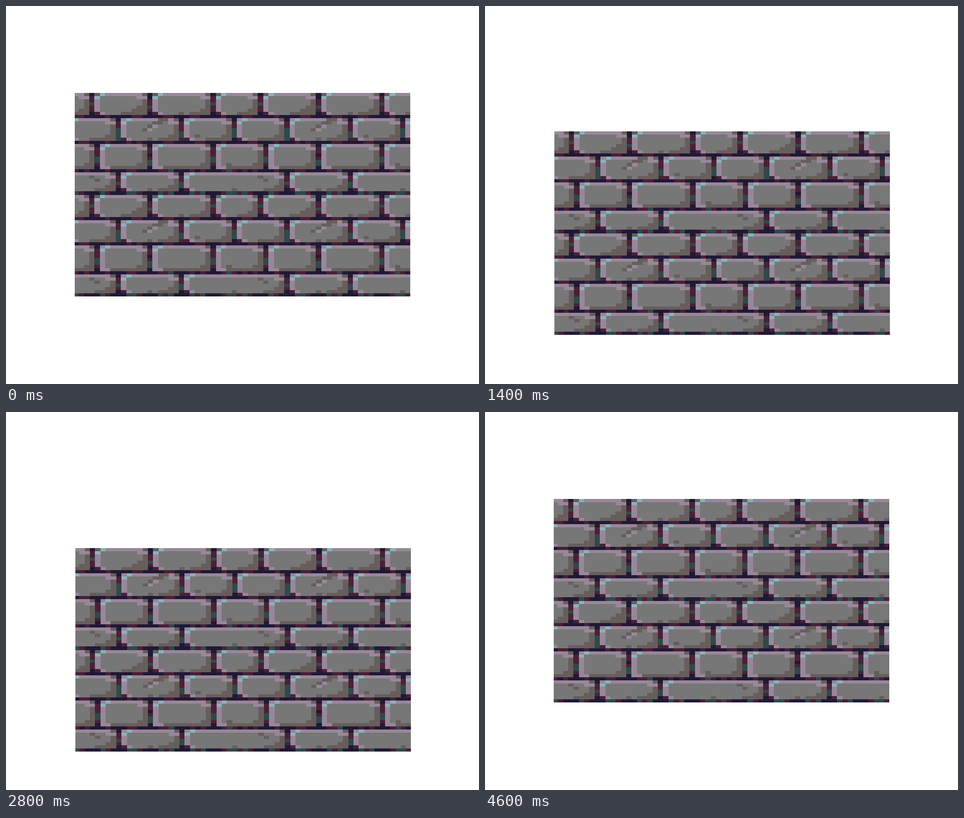
An HTML page with a canvas for the animation above (4800 ms loop, 750 by 600 pixels).

```html
<!DOCTYPE html>
<html lang="en">
<head>
<meta charset="utf-8">
<title>Brick wall</title>
<style>
  html, body { margin: 0; width: 100%; height: 100%; overflow: hidden; background: #fff; }
  canvas { display: block; }
</style>
</head>
<body>
<canvas id="stage" width="750" height="600"></canvas>
<script>
const COLORS = {
  body: '#777777', light: '#988799', glint: '#89b3bb', shade: '#675e5b',
  n: '#201936', m: '#4a2137', t: '#2e4a4b'
};
const TILE = 32, WIDTH = 532, HEIGHT = 323;
const CELL_X = 8.356, CELL_Y = HEIGHT / 64, INSET = 2;

// Each course of bricks is split by upright joints: column -> mortar colours, top down.
const courses = [
  { top: 0, height: 7, joints: { 3: 'nmmtmmn', 14: 'nnmmtmn', 26: 'nmmtmmn' } },
  { top: 8, height: 7, joints: { 8: 'nmmtttt', 20: 'nmmmttm', 30: 'nmmtttn' } },
  { top: 16, height: 8, joints: { 4: 'nmmmttmn', 14: 'nmmnmttn', 26: 'nmmmttmn' } },
  { top: 25, height: 6, joints: { 8: 'nmmtmn', 20: 'nmmttn' } }
];

const wall = document.createElement('canvas');
wall.width = WIDTH;
wall.height = HEIGHT;
const paint = wall.getContext('2d');

// Paints a run of cells in every repeat of the tile.
function cells(color, col, row, w = 1, h = 1) {
  paint.fillStyle = COLORS[color];
  for (let c = col; c < col + w; c++) {
    for (let x = c % TILE; x < 64; x += TILE) {
      const left = Math.round(x * CELL_X - INSET);
      const right = Math.round((x + 1) * CELL_X - INSET);
      for (let y = row; y < 64; y += TILE) {
        const up = Math.round(y * CELL_Y);
        paint.fillRect(left, up, right - left, Math.round((y + h) * CELL_Y) - up);
      }
    }
  }
}

function brick(col, row, w, h) {
  const right = col + w - 1, bottom = row + h - 1, deep = h === 8;
  cells('body', col, row, w, h);
  cells('light', col, row, w);
  cells('light', col, row, 1, h);
  cells('glint', col + 1, row);
  cells('glint', col, row + 1);
  cells('shade', right, row + 2, 1, h - 2);
  cells('light', right, row + 1);
  cells('light', right - 1, row + 1);
  cells('shade', right, row);
  cells('shade', right - 1, bottom - 1, 1, 2);
  if (deep) cells('shade', col + 2, bottom, w - 2);
  else {
    cells('shade', right - 3, bottom, 3);
    cells('shade', col + (w >> 1), bottom);
  }
  cells('light', col + 1, bottom);
  cells(deep ? 'light' : 'm', col, bottom);
  if (row === 0) cells('shade', col, row);
}

function bedJoint(row, columns) {
  const last = row === TILE - 1;
  for (let col = 0; col < TILE; col++) {
    const near = columns.some(j => Math.abs(j - col) < 2);
    const fleck = (col * 7 + row * 3) % 11;
    const color = near ? 'n' : last ? (fleck < 4 ? 'm' : 't') : fleck < 1 ? 't' : fleck < 4 ? 'n' : 'm';
    cells(color, col, row);
  }
}

courses.forEach(({ top, height, joints }, i) => {
  const columns = Object.keys(joints).map(Number);
  const below = Object.keys(courses[(i + 1) % courses.length].joints).map(Number);
  columns.forEach((col, j) => {
    const next = columns[j + 1] ?? columns[0] + TILE;
    brick(col + 1, top, next - col - 1, height);
    [...joints[col]].forEach((color, y) => cells(color, col, top + y));
  });
  bedJoint(top + height, columns.concat(below));
});

// Chips and cracks
cells('shade', 13, 3);
cells('shade', 12, 4, 2);
cells('shade', 11, 5, 2);
cells('shade', 16, 8, 2);
cells('shade', 15, 9, 2);
cells('shade', 14, 10);
cells('shade', 13, 11);
cells('light', 15, 10);
cells('light', 14, 11);
cells('shade', 23, 13);
cells('shade', 29, 22);
cells('shade', 3, 26);
cells('shade', 4, 27);

const TOPS = [138, 147, 156, 164, 173, 182, 191, 199, 208, 216, 225, 234];
const stage = document.getElementById('stage').getContext('2d');

function draw() {
  const step = Math.floor(performance.now() % 4800 / 200);
  const pose = Math.min(step, 23 - step);
  stage.fillStyle = '#fff';
  stage.fillRect(0, 0, 750, 600);
  stage.drawImage(wall, pose < 6 ? 109 : 110, TOPS[pose]);
  requestAnimationFrame(draw);
}
draw();
</script>
</body>
</html>
```
